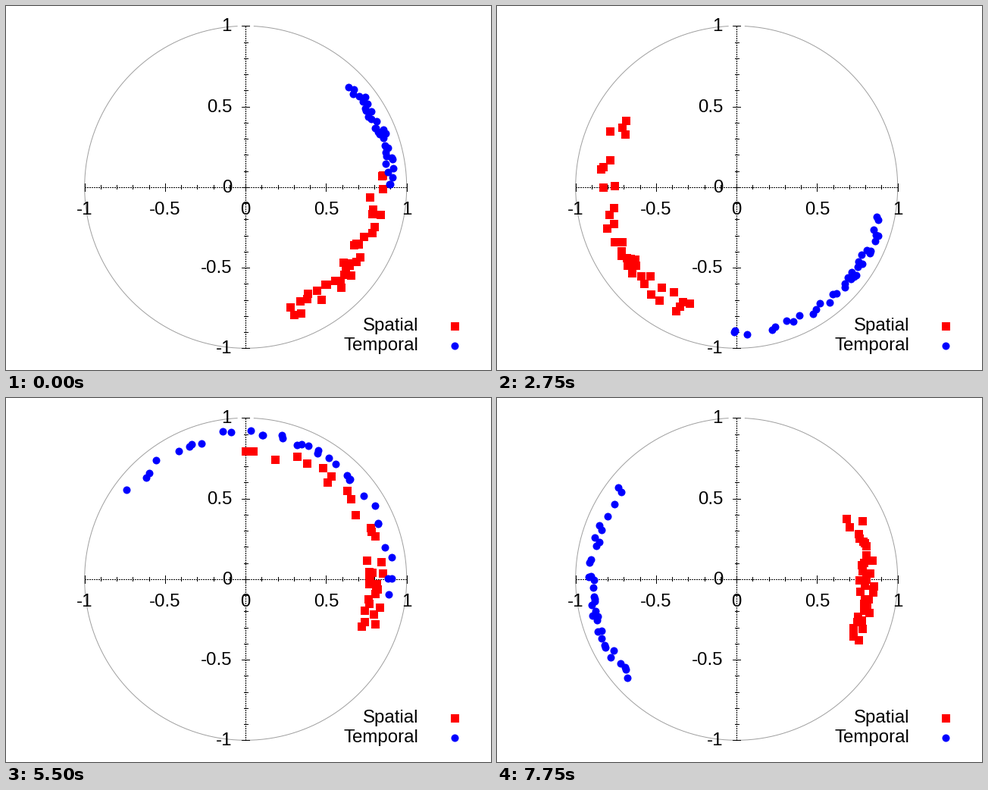
Animation of 640x480 px, one loop 8000 ms. Source, as a matplotlib script:

```python
import numpy as np
import matplotlib.pyplot as plt
from matplotlib.animation import FuncAnimation

W, H, DPI = 640, 480, 100
PX = 72 / DPI                      # points per pixel
CX, CY, R = 316.2, 238.8, 212.5
FRAMES, INTERVAL, COUNT = 32, 250, 34
RED, BLUE, GRAY = "#ff0000", "#0000ff", "#a0a0a0"

# Extent of each swarm in degrees (first, median, last) at the turning points.
POSE_FRAMES = [0, 7, 11, 18, 22, 28, 31]
SPATIAL = [(-72, -38, 5), (-116, -60, -8), (-215, -148, -110), (-118, -66, -4),
           (-22, 3, 90), (12, 44, 103), (-28, -3, 29)]
TEMPORAL = [(0, 22, 44), (183, 228, 262), (269, 321, 348), (200, 270, 325),
            (354, 426, 503), (482, 555, 591), (501, 549, 582)]


def scatter(extent, rng):
    """Angles that lie denser near the median than at the ends."""
    first, median, last = extent
    u = np.linspace(-1, 1, COUNT) + rng.uniform(-0.06, 0.06, COUNT)
    u = np.clip(u, -1, 1)
    reach = np.where(u < 0, median - first, last - median)
    return median + reach * np.sign(u) * np.abs(u) ** 1.3


def track(poses):
    """Move each point evenly from pose to pose over all frames."""
    frames = np.arange(FRAMES)
    return np.array([np.interp(frames, POSE_FRAMES, p) for p in np.transpose(poses)]).T


def swarm_path(extents, radius, noise, seed):
    rng = np.random.default_rng(seed)
    ang = np.radians(track([scatter(e, rng) for e in extents]))
    rad = track(radius + rng.uniform(-noise, noise, (len(extents), COUNT)))
    return CX + R * rad * np.cos(ang), CY - R * rad * np.sin(ang)


fig = plt.figure(figsize=(W / DPI, H / DPI), dpi=DPI, facecolor="white")
ax = fig.add_axes([0, 0, 1, 1])
ax.set(xlim=(0, W), ylim=(H, 0))
ax.axis("off")


def line(x, y, color="black", **style):
    ax.plot(x, y, color=color, lw=PX, zorder=1, **style)


def label(x, y, text, ha):
    ax.text(x, y, text, ha=ha, va="baseline", family="Liberation Sans",
            fontsize=24 * PX, color="black", zorder=2)


def squares(x=(), y=()):
    return ax.plot(x, y, "s", color=RED, ms=11 * PX, mew=0, zorder=3)[0]


def circles(x=(), y=()):
    return ax.plot(x, y, "o", color=BLUE, ms=10 * PX, mew=0, zorder=4)[0]


# Unit circle, open around the top
t = np.radians(np.linspace(93, 447, 500))
line(CX + R * np.cos(t), CY - R * np.sin(t), GRAY)

# Dotted axes with ticks
dotted = dict(dashes=(2, 2), dash_capstyle="butt", antialiased=False)
line([CX - R, CX + R], [CY, CY], **dotted)
line([CX, CX], [CY + R, CY - R], **dotted)
for i in range(-10, 11):
    size = 5 if i % 5 == 0 else 2.5
    d = R * i / 10
    line([CX + d, CX + d], [CY - size, CY + size])
    line([CX - size, CX + size], [CY - d, CY - d])

for v in (-1, -0.5, 0, 0.5, 1):
    label(CX + R * v, 275, f"{v:g}", "center")
    label(298, CY - R * v + 7, f"{v:g}", "right")

label(544.5, 428, "Spatial", "right")
label(544.5, 454, "Temporal", "right")
squares([592], [422])
circles([592], [448])

swarms = [
    (squares(), swarm_path(SPATIAL, 0.81, 0.05, 4)),
    (circles(), swarm_path(TEMPORAL, 0.905, 0.025, 9)),
]


def update(frame):
    for points, (x, y) in swarms:
        points.set_data(x[frame], y[frame])
    return [points for points, _ in swarms]


anim = FuncAnimation(fig, update, frames=FRAMES, interval=INTERVAL,
                     repeat=True, repeat_delay=0)
plt.show()
```
